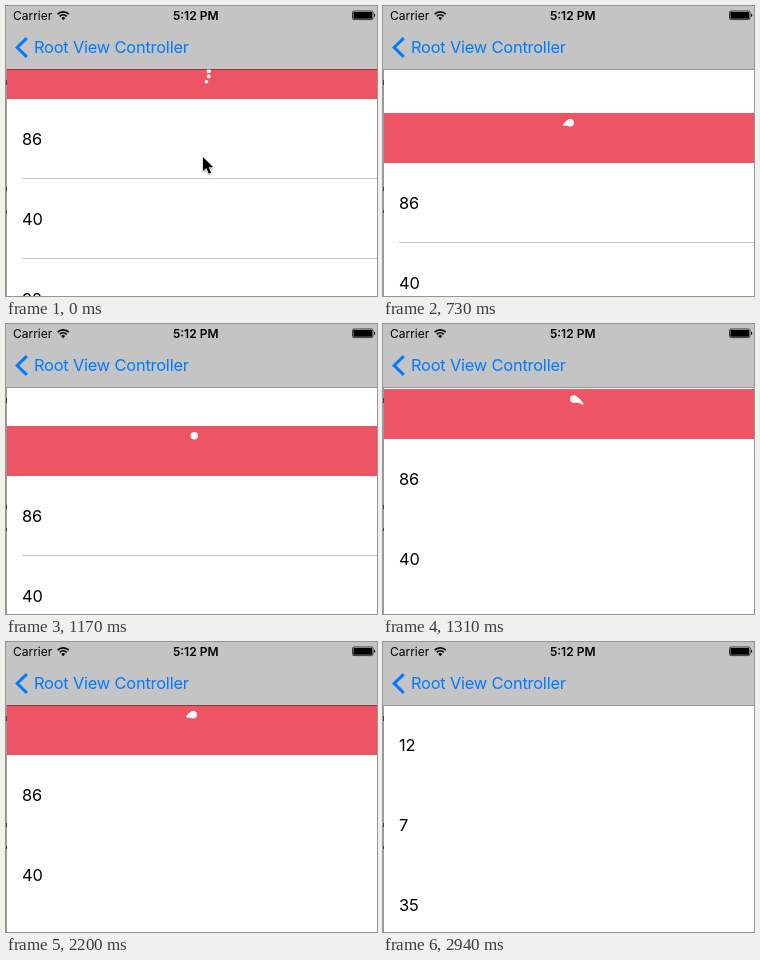
An HTML page for the animation above (3.38 s loop, 371 by 290 pixels).

```html
<!DOCTYPE html>
<html lang="en">
<head>
<meta charset="utf-8">
<title>Pull to refresh</title>
<style>
  html, body { margin: 0; width: 100%; height: 100%; overflow: hidden; background: #fefefe; }
  svg { display: block; width: 100%; height: 100%; }
  text { font-family: Inter, Roboto, sans-serif; }
  .status { font-size: 12px; }
  .body { font-size: 16.4px; letter-spacing: -0.2px; }
</style>
</head>
<body>
<svg viewBox="0 0 371 290" preserveAspectRatio="none">
  <rect width="371" height="290" fill="#fefefe"/>

  <g id="table">
    <rect x="1" y="-50" width="370" height="50" fill="#ed5565"/>
    <g id="spinner" fill="#fff"></g>
    <g id="rows" class="body"></g>
  </g>

  <rect y="64" width="1" height="226" fill="#9a9a9a"/>
  <path d="M0.5 74v5M0.5 181v4M0.5 204v3" stroke="#444"/>

  <g id="bar">
    <rect width="371" height="63" fill="#c4c4c4"/>
    <rect y="63" width="371" height="1" fill="#000" fill-opacity=".4"/>
    <text class="status" x="7" y="13.6">Carrier</text>
    <text class="status" x="189.7" y="13.6" text-anchor="middle" font-weight="600">5:12 PM</text>
    <g fill="none" stroke="#000" stroke-width="1.7">
      <path d="M51.6 8.2a8 8 0 0 1 11.2 0M53.7 10.4a5 5 0 0 1 7 0"/>
      <path d="M57.2 14.2l-2-2.2a2.9 2.9 0 0 1 4 0z" fill="#000" stroke="none"/>
    </g>
    <rect x="346.5" y="5" width="20.5" height="8.6" rx="1.5" fill="none" stroke="#000" stroke-width=".7"/>
    <rect x="347.4" y="5.9" width="18.7" height="6.8" rx=".6"/>
    <path d="M368 7.5a2 2 0 0 1 0 3.6z"/>
    <path d="M20.8 32.2L11.2 41.5L20.8 50.8" fill="none" stroke="#007aff" stroke-width="3"/>
    <text class="body" x="28" y="47.3" fill="#007aff">Root View Controller</text>
  </g>

  <path id="cursor" d="M0 0V14L3.3 11L5.8 16.7L8.1 15.7L5.7 10.2H10.2Z" stroke="#fff" stroke-width="1" paint-order="stroke" style="filter:drop-shadow(0 1px 1px rgba(0,0,0,.35))"/>
</svg>

<script>
  const LOOP = 3380, ROW = 80;
  const STARTS = [0, 150, 290, 440, 580, 730, 870, 1020, 1170, 1310, 1460,
                  1600, 1750, 1900, 2050, 2200, 2350, 2490, 2640, 2790, 2940];
  // Top edge of the first row at each step; it rests at 113 while loading.
  const PULL = [93, 118, 147, 153, 153, 157, 169, 170, 152, 115];
  const COLLAPSE = { 18: 88, 19: 63.4, 20: 63 };
  const CURSOR = [[197, 151], [196, 205], [195, 270], [194.5, 285], [194.5, 285]];
  const BEFORE = [86, 40, 92], AFTER = [12, 7, 35];
  const RELOAD_STEP = 18, LAST_LINED_STEP = 8;
  const BALLS = 5, BALL_RADIUS = 3.75, ORBIT = 14.7;

  const byId = id => document.getElementById(id);
  const table = byId("table"), cursor = byId("cursor");

  function add(parent, tag, attrs) {
    const el = document.createElementNS("http://www.w3.org/2000/svg", tag);
    for (const name in attrs) el.setAttribute(name, attrs[name]);
    return parent.appendChild(el);
  }

  const balls = Array.from({ length: BALLS }, () => add(byId("spinner"), "circle", {}));
  const labels = BEFORE.map((_, i) => add(byId("rows"), "text", { x: 16, y: i * ROW + 45.5 }));
  const lines = BEFORE.map((_, i) =>
    add(byId("rows"), "rect", { x: 16, y: (i + 1) * ROW - 1, width: 355, height: 1, fill: "#c2c2c2" }));

  const bezier = (t, a, b) => 3 * (1 - t) ** 2 * t * a + 3 * (1 - t) * t * t * b + t ** 3;

  function ease(x, y1) {
    let low = 0, high = 1;
    for (let i = 0; i < 24; i++) {
      const mid = (low + high) / 2;
      if (bezier(mid, 0.5, 0.25) < x) low = mid; else high = mid;
    }
    return bezier(low, y1, 1);
  }

  // Balls chase each other around the circle, later ones leading and growing.
  function drawSpinner(phase) {
    balls.forEach((ball, i) => {
      const rate = i / BALLS;
      const turn = ease(phase, 0.15 + rate);
      const angle = turn * 2 * Math.PI;
      const scale = (1 - rate) * (1 - turn) + (0.2 + rate) * turn;
      ball.setAttribute("cx", 188.3 + ORBIT * Math.sin(angle));
      ball.setAttribute("cy", -25.5 - ORBIT * Math.cos(angle));
      ball.setAttribute("r", BALL_RADIUS * scale);
    });
  }

  function draw(step) {
    const top = PULL[step] ?? COLLAPSE[step] ?? 113;
    table.setAttribute("transform", `translate(0 ${top})`);
    drawSpinner((0.169 + step * 0.1) % 1);

    const values = step < RELOAD_STEP ? BEFORE : AFTER;
    labels.forEach((label, i) => label.textContent = values[i]);
    lines.forEach(line => line.style.display = step <= LAST_LINED_STEP ? "" : "none");

    const tip = CURSOR[step];
    cursor.style.display = tip ? "" : "none";
    if (tip) cursor.setAttribute("transform", `translate(${tip})`);
  }

  const begin = performance.now();
  let shown = -1;
  function tick() {
    const time = (performance.now() - begin) % LOOP;
    const step = STARTS.findLastIndex(start => start <= time);
    if (step !== shown) draw(shown = step);
    requestAnimationFrame(tick);
  }
  tick();
</script>
</body>
</html>
```
